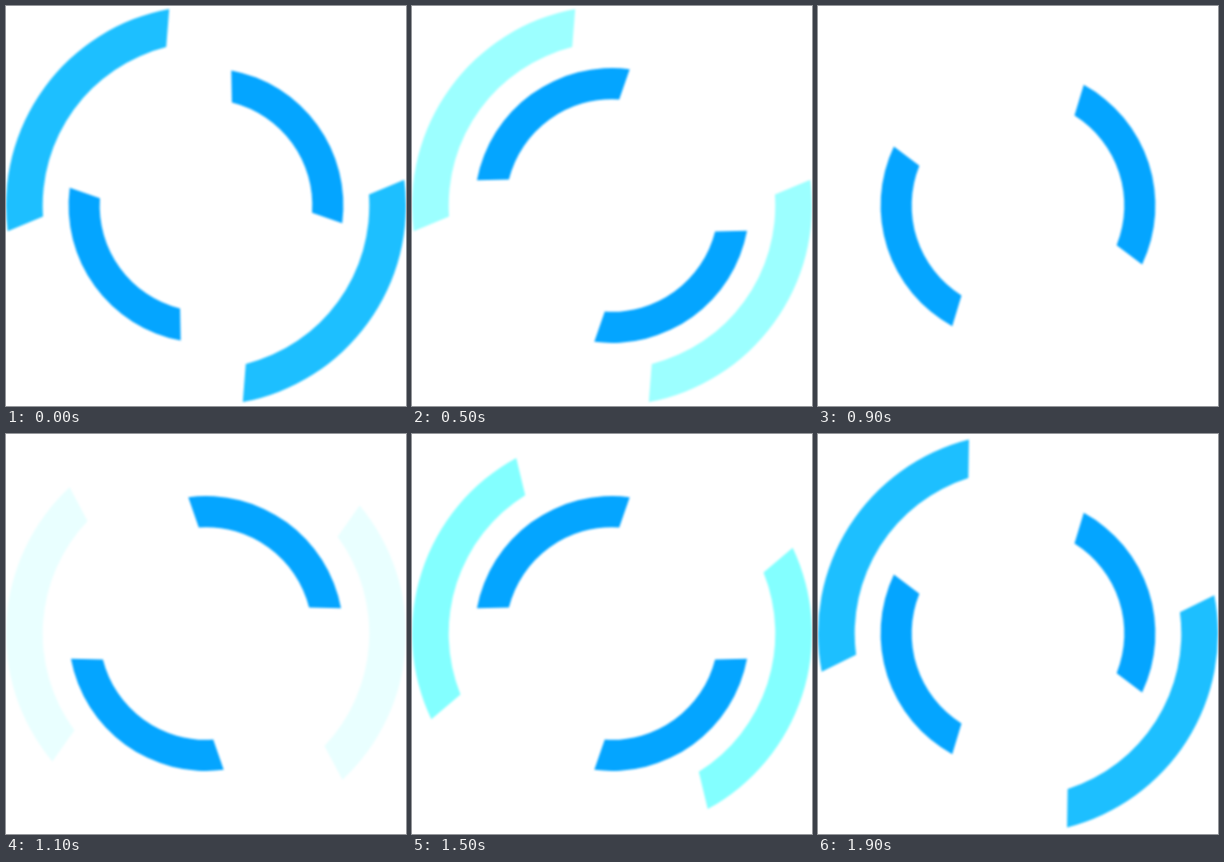
An HTML page for the animation above (2 s loop, 400 by 400 pixels).

```html
<!DOCTYPE html>
<html>
<head>
<meta charset="utf-8">
<style>
  html, body { margin: 0; width: 100%; height: 100%; overflow: hidden; background: #fff; }
  svg { display: block; width: 100vw; height: 100vh; filter: blur(.8px); }
</style>
</head>
<body>
<svg viewBox="0 0 400 400">
  <g transform="translate(200 199.5)">
    <path id="outer"/>
    <path id="inner" fill="#04a5ff"/>
  </g>
</svg>
<script>
const STEP = 100, STEPS = 20;
const OUTER_HALF = 43.4, INNER_HALF = 39.9; // half spans of each arc's two edges, in degrees
const outer = document.getElementById('outer');
const inner = document.getElementById('inner');

function point(radius, degrees) {
  const a = degrees * Math.PI / 180;
  return `${radius * Math.cos(a)} ${radius * Math.sin(a)}`;
}

function arc(r1, r2, middle) {
  return `M${point(r1, middle - OUTER_HALF)}` +
    `A${r1} ${r1} 0 0 1 ${point(r1, middle + OUTER_HALF)}` +
    `L${point(r2, middle + INNER_HALF)}` +
    `A${r2} ${r2} 0 0 0 ${point(r2, middle - INNER_HALF)}Z`;
}

const arcPair = (r1, r2) => arc(r1, r2, 0) + arc(r1, r2, 180);

outer.setAttribute('d', arcPair(200, 163.3));
inner.setAttribute('d', arcPair(137.4, 106.3));

function draw(time) {
  const step = Math.floor(time / STEP) % STEPS;
  inner.setAttribute('transform', `rotate(${-36 - 18 * step})`);

  // The outer pair spins fast while fading to white, then creeps back into colour.
  const rising = step < 10;
  const light = rising ? step + 1 : 20 - step;
  const angle = rising ? 36 * light : 3.6 * (10 - light);
  const channel = base => Math.min(255, Math.round(base + 25.5 * light));
  outer.setAttribute('transform', `rotate(${angle})`);
  outer.setAttribute('fill', `rgb(${channel(3)},${channel(165)},255)`);
}

const start = performance.now();
function tick() {
  draw(performance.now() - start);
  requestAnimationFrame(tick);
}
tick();
</script>
</body>
</html>
```
